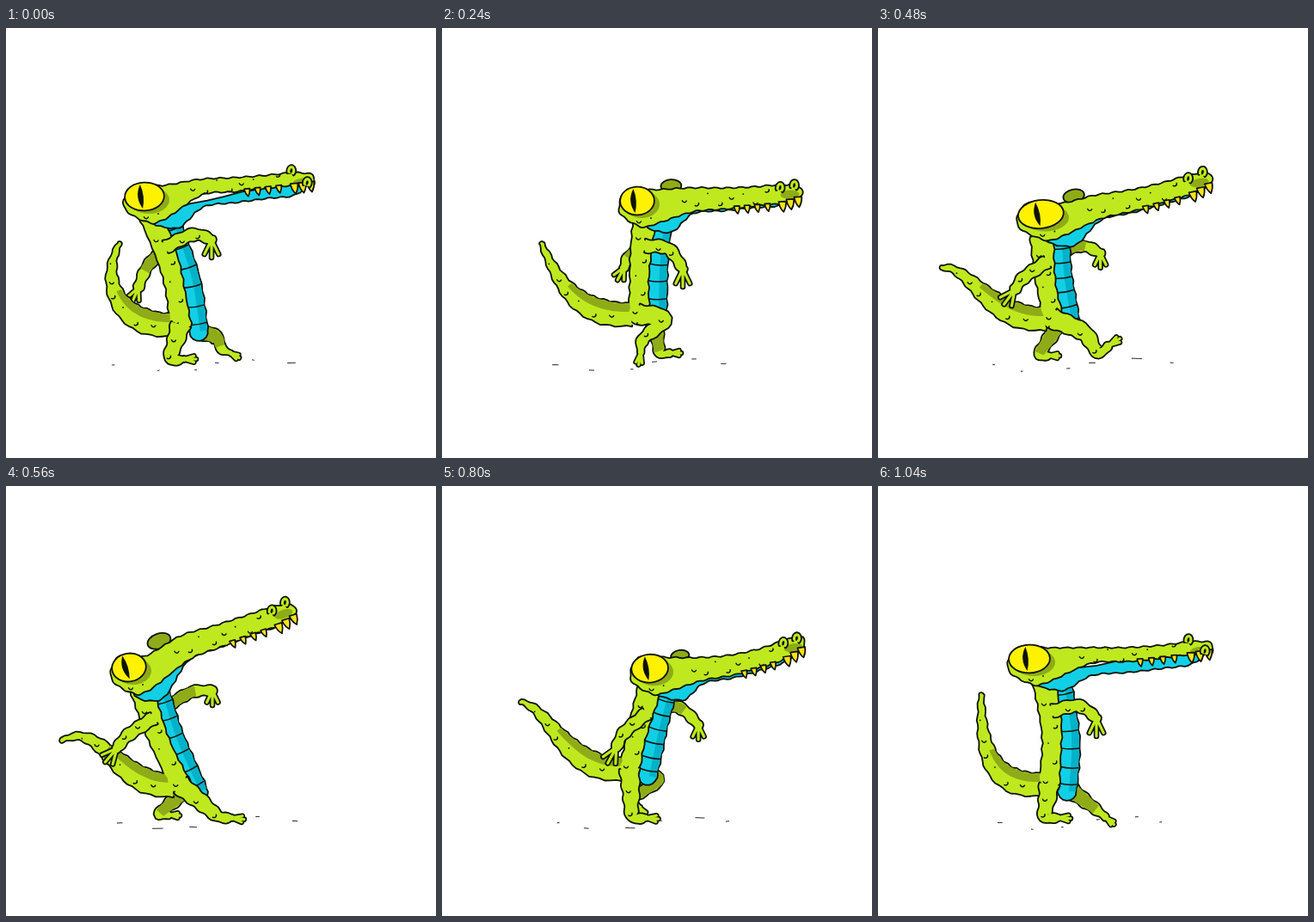
Recreate the animation shown at these times as an HTML page with a canvas. Size 500x500 px, loop 1120 ms.

```html
<!DOCTYPE html>
<html lang="en">
<head>
<meta charset="utf-8">
<title>Walking crocodile</title>
<style>
html, body { margin: 0; width: 100%; height: 100%; overflow: hidden; background: #fff; }
canvas { display: block; width: 500px; height: 500px; }
</style>
</head>
<body>
<canvas id="stage" width="500" height="500"></canvas>
<script>
const g = document.getElementById('stage').getContext('2d');
const LOOP = 1120, STEP = 80;
const INK = '#0d1208', GREEN = '#bfe91e', DARK = '#8fab18';
const CYAN = '#12cfe6', TEAL = '#00b2c9', YELLOW = '#fff200', GOLD = '#ffe21a';

// The few handles that drive the rig; everything else follows from them.
const TRACKS = {
  eye: [[161,196], [227,201], [238,219], [143,211], [172,205], [293,218], [176,201]],
  eyeW: [23, 20, 32, 20, 22, 21, 24],
  tip: [[350,178], [410,192], [433,208], [328,146], [370,162], [444,204], [380,190]],
  sag: [1, 3, 13, 0, 7, 16, 6],
  gape: [1, .15, .25, 0, .25, .3, 1],
  neck: [[168,216], [236,219], [228,245], [158,236], [188,228], [280,243], [193,225]],
  hip: [[203,345], [229,333], [207,328], [203,348], [205,342], [227,320], [199,347]],
  tail: [[132,251], [116,251], [88,258], [65,296], [69,279], [115,228], [120,243]],
  bend: [[109,290], [133,290], [108,280], [112,270], [112,248], [135,270], [120,295]],
  handA: [[239,246], [280,280], [200,301], [129,305], [136,304], [267,300], [254,270]],
  handB: [[154,302], [212,278], [273,287], [240,238], [267,259], [312,293], [201,285]],
  footA: [[191,385], [234,362], [260,369], [247,384], [238,383], [205,386], [194,385]],
  footB: [[250,372], [254,378], [203,379], [178,382], [184,381], [259,350], [256,378]],
  toesA: [0, 1.75, -.9, .12, .12, .05, .05],
  toesB: [.5, 0, 0, .05, .1, 1.65, .7]
};
const KEYS = TRACKS.sag.length;
const keyTime = i => i % KEYS ? 80 + 160 * i : i && LOOP;

const mix = (a, b, k) => a + (b - a) * k;
const mixPt = (a, b, k) => [mix(a[0], b[0], k), mix(a[1], b[1], k)];
const add = (p, x, y) => [p[0] + x, p[1] + y];
const polar = (p, a, r) => add(p, r * Math.cos(a), r * Math.sin(a));
const clamp = v => Math.max(0, Math.min(1, v));
const heading = (a, b) => Math.atan2(b[1] - a[1], b[0] - a[0]);

// Catmull-Rom segment from b to c, for numbers or points
function cubic(a, b, c, d, u) {
  if (Array.isArray(b)) return b.map((v, j) => cubic(a[j], v, c[j], d[j], u));
  return b + .5 * u * (c - a + u * (2 * a - 5 * b + 4 * c - d + u * (3 * (b - c) + d - a)));
}

function poseAt(t) {
  let i = KEYS - 1;
  while (keyTime(i) > t) i--;
  const u = (t - keyTime(i)) / (keyTime(i + 1) - keyTime(i)), pose = {};
  for (const name in TRACKS) {
    const at = k => TRACKS[name][(i + k + KEYS) % KEYS];
    pose[name] = cubic(at(-1), at(0), at(1), at(2), u);
  }
  pose.gape = clamp(pose.gape);
  return pose;
}

function spline(p, closed) {
  const n = p.length, out = [];
  const at = i => closed ? p[(i + n) % n] : p[Math.max(0, Math.min(n - 1, i))];
  for (let i = 0; i < (closed ? n : n - 1); i++)
    for (let s = 0; s < 10; s++) out.push(cubic(at(i - 1), at(i), at(i + 1), at(i + 2), s / 10));
  if (!closed) out.push(p[n - 1]);
  return out;
}

function bezier(a, b, c, d) {
  return Array.from({ length: 33 }, (_, i) => {
    const u = i / 32, ab = mixPt(a, b, u), bc = mixPt(b, c, u), cd = mixPt(c, d, u);
    return mixPt(mixPt(ab, bc, u), mixPt(bc, cd, u), u);
  });
}

// Calls back with each point, its normal angle and the length walked so far
function walk(pts, closed, visit) {
  const n = pts.length;
  let len = 0;
  return pts.map((p, i) => {
    const a = pts[closed ? (i + n - 1) % n : Math.max(0, i - 1)];
    const b = pts[closed ? (i + 1) % n : Math.min(n - 1, i + 1)];
    if (i) len += Math.hypot(p[0] - pts[i - 1][0], p[1] - pts[i - 1][1]);
    return visit(p, heading(a, b) + Math.PI / 2, len, i);
  });
}

function trace(pts, closed) {
  const path = new Path2D();
  pts.forEach(p => path.lineTo(...p));
  if (closed) path.closePath();
  return path;
}

function blob(pts) {
  return trace(walk(spline(pts, true), true, (p, a, len) => polar(p, a, .8 * Math.sin(len * .42))), true);
}

// Bumpy tube along a spine, open at its start and round at its end
function tube(mid, radii) {
  const last = mid.length - 1;
  const radius = i => {
    const u = i / last * (radii.length - 1), k = Math.min(radii.length - 2, Math.floor(u));
    return mix(radii[k], radii[k + 1], u - k);
  };
  const normal = walk(mid, false, (p, a) => a);
  const side = (i, k) => polar(mid[i], normal[i], radius(i) * k);
  const edge = (dir, freq, phase) => walk(mid, false, (p, a, len, i) =>
    polar(p, a, dir * (radius(i) + .9 * Math.sin(len * freq + phase))));
  const left = edge(1, .4, 0), right = edge(-1, .37, 2), cap = [];
  for (let j = 1; j < 8; j++) cap.push(polar(mid[last], normal[last] - j * Math.PI / 8, radius(last)));
  const strip = (from, to, start, end) => {
    const ids = [...mid.keys()].slice(Math.round(start * last), Math.round(end * last) + 1);
    return trace([...ids.map(i => side(i, from)), ...ids.reverse().map(i => side(i, to))], true);
  };
  return { path: trace([...left, ...cap, ...right.reverse()]), side, strip, last };
}

function ink(path, w = 3.6) {
  g.strokeStyle = INK;
  g.lineWidth = w;
  g.stroke(path);
}

function fill(path, color) {
  g.fillStyle = color;
  g.fill(path);
}

function shape(path, color) {
  ink(path);
  fill(path, color);
}

function oval([x, y], rx, ry, tilt = 0) {
  const path = new Path2D();
  path.ellipse(x, y, rx, ry, tilt, 0, Math.PI * 2);
  return path;
}

// Small skin folds and specks
function fold(p, i) {
  if (i % 3 === 2) return fill(oval(p, .9, .9), INK);
  const path = new Path2D();
  path.arc(...p, 2.6, i % 2 ? -.3 : .4, i % 2 ? 2.2 : 2.9);
  ink(path, 1.4);
}

function limb(joints, radii, aim, reach, spread, shade) {
  const t = tube(spline(joints), radii), palm = joints[joints.length - 1];
  const digits = new Path2D();
  for (let i = -1; i <= 1; i++) {
    digits.moveTo(...palm);
    digits.lineTo(...polar(palm, aim + i * spread, reach - 2 * Math.abs(i)));
  }
  ink(digits, 6.6);
  shape(t.path, GREEN);
  g.strokeStyle = GREEN;
  g.lineWidth = 3.2;
  g.stroke(digits);
  if (shade) fill(t.strip(1, -1, 0, shade), DARK);
  else [.3, .6].forEach((k, i) => fold(t.side(Math.round(k * t.last), .3), i));
}

function arm(shoulder, hand, radii, reach, shade) {
  const ahead = clamp((hand[0] - shoulder[0]) / 30);
  const elbow = add(mixPt(shoulder, hand, .5), mix(-8, 5, ahead), mix(2, -10, ahead));
  const aim = Math.atan2(hand[1] - elbow[1] + 40 * ahead, (hand[0] - elbow[0]) * (1 - ahead));
  limb([shoulder, elbow, hand], radii, aim, reach, .45, shade);
}

function leg(hip, foot, toes, ground, radii, reach, shade) {
  const lift = clamp((ground - foot[1]) / 8);
  const knee = add(mixPt(hip, foot, .5), 26 * lift, -9 * lift);
  limb([hip, knee, foot, polar(foot, toes, reach)], radii, toes, reach, .28, shade);
}

function drawBelly(p, arch) {
  const top = add(p.neck, 21, 2), end = add(p.hip, 21, 8);
  const t = tube(spline([top, add(mixPt(top, end, .5), arch, 0), end]), [10, 10, 11, 10]);
  shape(t.path, CYAN);
  fill(t.strip(-.2, -1, 0, 1), TEAL);
  for (let i = 3; i < t.last; i += 3) {
    const a = t.side(i, 1), b = t.side(i, -1), line = new Path2D();
    line.moveTo(...a);
    line.quadraticCurveTo(...add(mixPt(a, b, .5), 0, 2), ...b);
    ink(line, 1.5);
  }
}

function drawTrunk(p, spine) {
  const base = add(p.hip, -9, 0);
  const tail = tube(bezier(base, add(base, -65, 4), p.bend, p.tail), [12.5, 13.5, 11, 7.5, 4.5, 2]);
  const torso = tube(spine, [13, 11.5, 10, 11.5]);
  ink(tail.path);
  ink(torso.path);
  fill(tail.path, GREEN);
  fill(tail.strip(.25, 1, 0, .55), DARK);
  fill(torso.path, GREEN);
  for (let j = 0; j < 6; j++)
    fold(tail.side(Math.round(mix(.12, .8, j / 5) * tail.last), j % 2 ? -.5 : -.1), j);
  for (let j = 0; j < 5; j++)
    fold(torso.side(Math.round(mix(.25, .95, j / 4) * torso.last), j % 2 ? -.4 : .4), j);
}

function tooth(p, angle, size) {
  g.save();
  g.translate(...p);
  g.rotate(angle * .9);
  const path = new Path2D(), w = size * .4;
  path.moveTo(-w, -1);
  path.quadraticCurveTo(-w * .8, size * .6, 1, size);
  path.quadraticCurveTo(w, size * .5, w, -1);
  path.closePath();
  fill(path, GOLD);
  ink(path, 1.7);
  g.restore();
}

function drawHead(p) {
  const { eye, tip, gape, eyeW: rx } = p, ry = 16, angle = heading(eye, tip);
  // A place on the snout: u runs from eye to tip, k is the distance below its axis
  const snout = (u, k) => polar(add(mixPt(eye, tip, u), 0, p.sag * 4 * u * (1 - u)), angle + Math.PI / 2, k);
  const half = u => 10.5 + 8 * (1 - u) ** 2;
  const lip = u => half(u) * (1 - .8 * gape);
  const along = [.35, .55, .75, .92], back = along.slice().reverse();
  const chin = add(eye, 4, 29);

  const bump = 13 * (1 - gape);
  if (bump > 1) shape(oval(snout(.22, -half(.22) - 2), bump, bump * .6, angle), DARK);
  shape(blob([snout(.93, 0), ...back.map(u => snout(u, half(u) + 3 * gape)),
    add(chin, 34, 7), add(chin, 10, -8)]), CYAN);

  const head = blob([
    add(eye, -rx * .5, -13), add(eye, rx * .9, -12),
    ...along.map(u => snout(u, -half(u))),
    snout(1.03, -6), snout(1.03, 5),
    ...back.map(u => snout(u, lip(u))),
    add(chin, 20, -4), chin, add(eye, -rx, 12)
  ]);
  shape(head, GREEN);
  g.save();
  g.clip(head);
  fill(oval(add(eye, 5, 4), rx + 1, ry), DARK);
  fill(oval(snout(.97, 1), 11, 5, angle), DARK);
  g.restore();

  for (let i = 0; i < 8; i++) fold(snout(.3 + .075 * i, half(.5) * .55 * Math.sin(i * 2.4) - 5 * gape), i);
  fold(add(chin, -2, -6), 0);
  fold(add(chin, 12, -9), 2);

  for (let i = 0; i < 4; i++) tooth(snout(.63 + .065 * i, lip(.7)), angle, 8);
  for (let i = 0; i < 3; i++) tooth(snout(.92 + .05 * i, lip(.95) - 2 * i * (1 - gape)), angle, 11);

  [snout(1, -11 + 13 * gape), snout(.91, -7 - 7 * gape)].forEach(at => {
    const rim = new Path2D();
    rim.ellipse(...at, 4.5, 6, .1, Math.PI * .85, Math.PI * 2.25);
    shape(rim, GREEN);
    fill(oval(at, 1.4, 2.8, .2), INK);
  });

  const ball = oval(eye, rx - 1, ry - .5, angle * .5);
  shape(ball, YELLOW);
  const slit = new Path2D();
  slit.moveTo(0, -ry + 2);
  slit.quadraticCurveTo(-8, 0, 1, ry - 2);
  slit.quadraticCurveTo(5, 0, 0, -ry + 2);
  g.save();
  g.translate(eye[0] - 4, eye[1]);
  g.rotate(angle * .8);
  fill(slit, INK);
  g.restore();
}

function drawMarks(step) {
  let seed = step * 97 + 31;
  const rand = () => (seed = seed * 16807 % 2147483647) / 2147483647;
  rand();
  for (let i = 0; i < 6; i++) {
    const x = 122 + 40 * i + 18 * rand(), y = 391 + 7 * Math.sin(i * 1.2) + 2 * rand();
    ink(trace([[x, y], [x + 2 + 10 * rand() ** 2, y + rand() - .5]]), .9);
  }
}

function draw(t) {
  const step = Math.floor(t / STEP), p = poseAt(step * STEP);
  const arch = 10 * p.gape - 4;
  const spine = spline([p.neck, add(mixPt(p.neck, p.hip, .5), arch, 0), p.hip]);
  const chest = spine[6];
  g.fillStyle = '#fff';
  g.fillRect(0, 0, 500, 500);
  g.lineCap = g.lineJoin = 'round';
  drawMarks(step);
  arm(add(chest, 10, -4), p.handB, [6, 6, 5], 17, .6);
  const hipB = [p.hip[0] + 10 + .3 * (p.footB[0] - p.hip[0]), p.hip[1] + 8];
  leg(hipB, p.footB, p.toesB, 374, [9, 7, 5, 3], 12, .6);
  drawBelly(p, arch);
  drawTrunk(p, spine);
  leg(p.hip, p.footA, p.toesA, 380, [11, 9, 6, 3.5], 15);
  drawHead(p);
  arm(add(chest, 4, 3), p.handA, [7, 6.5, 5], 21);
}

let start;
function tick(now) {
  if (start === undefined) start = now;
  draw(Math.max(0, now - start) % LOOP);
  requestAnimationFrame(tick);
}
draw(0);
requestAnimationFrame(tick);
</script>
</body>
</html>
```
